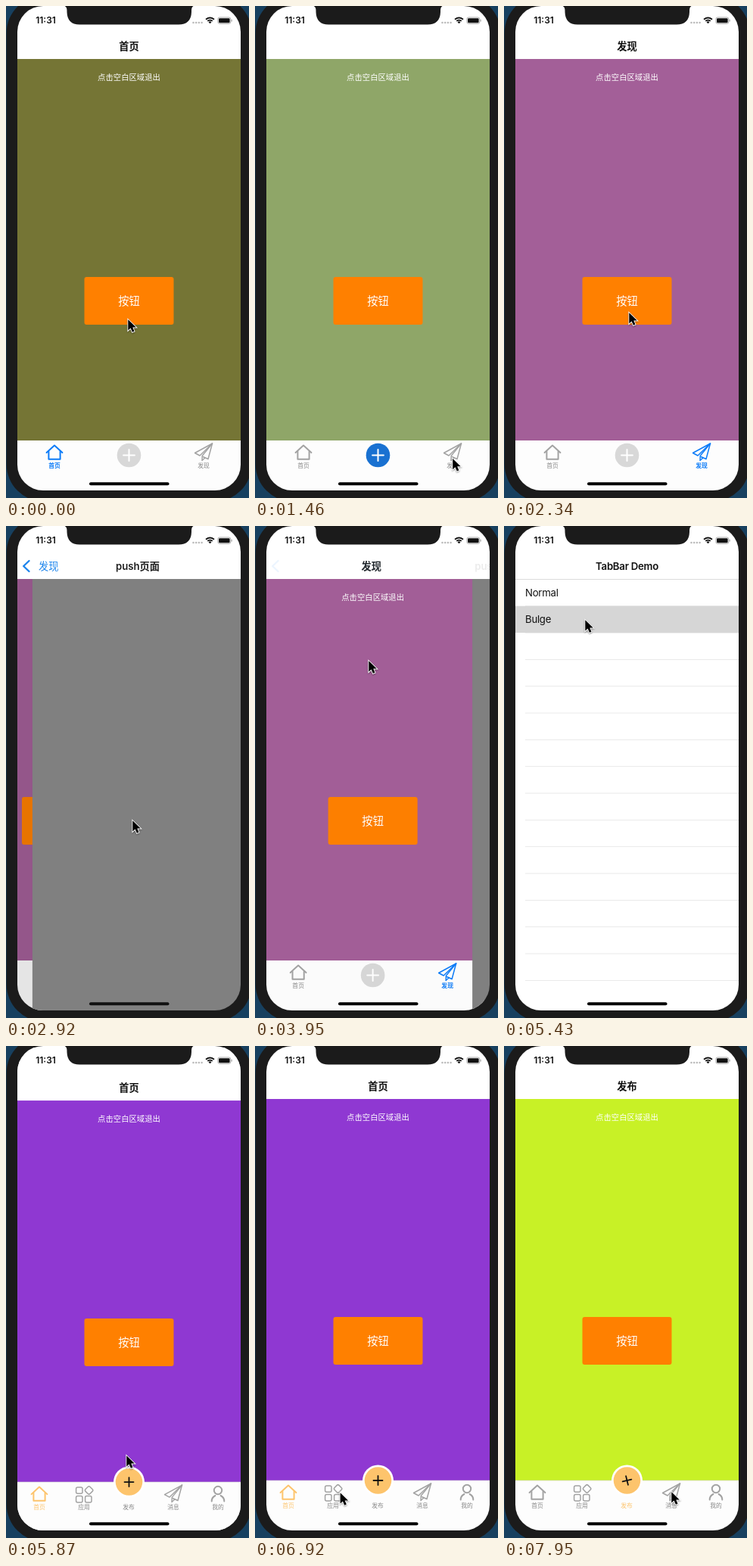
Animation of 321x650 px, one loop 8 s. Source, as an HTML page with a canvas:

```html
<!DOCTYPE html>
<html lang="zh">
<head>
<meta charset="utf-8">
<style>
html, body { margin: 0; width: 100%; height: 100%; overflow: hidden; background: #1b1b1b; }
canvas { display: block; width: 100vw; height: 100vh; }
</style>
</head>
<body>
<canvas id="stage"></canvas>
<script>
const W = 321, H = 650, LOOP = 8000;
const L = 15, R = 310, SW = R - L, BOT = 640, MID = 162.5, NAV = 70, TAB = 574;
const FONT = 'Inter, "Noto Sans CJK SC", "Noto Sans CJK", sans-serif';
const BLUE = '#0d7cf8', GOLD = '#fdc46c', ICON = '#a3a3a3', LABEL = '#888';

const cv = document.getElementById('stage');
const c = cv.getContext('2d');
const dpr = window.devicePixelRatio || 1;
cv.width = W * dpr;
cv.height = H * dpr;

const TICKS = [[0, 0], [8, 1170], [16, 2340], [20, 2920], [27, 3950], [34, 4990], [42, 6170], [50, 7360], [54, 7950]];
function hold(t) {
  let best = 0;
  for (let i = 1; i < TICKS.length; i++) {
    const [a, ta] = TICKS[i - 1], [b, tb] = TICKS[i];
    for (let k = a; k <= b; k++) {
      const s = Math.floor((ta + (tb - ta) * (k - a) / (b - a)) / 10) * 10;
      if (s <= t) best = s;
    }
  }
  return best;
}

const bez = (a, b, s) => 3 * (1 - s) * (1 - s) * s * a + 3 * (1 - s) * s * s * b + s * s * s;
// System transition curve, 500 ms
function slide(t, start) {
  const u = (t - start) / 500;
  if (u <= 0) return 0;
  if (u >= 1) return 1;
  let lo = 0, hi = 1;
  for (let i = 0; i < 24; i++) {
    const m = (lo + hi) / 2;
    if (bez(.38, .125, m) < u) lo = m; else hi = m;
  }
  return bez(.7, 1, lo);
}

// Pointer path: [ms, x, y]
const PATH = [[0, 161, 414], [600, 163, 588], [950, 165, 592], [1430, 261, 598], [1620, 259, 594],
  [2340, 165, 405], [2480, 167, 389], [2920, 167, 389], [3760, 150, 180], [3950, 150, 178],
  [4500, 149, 176], [5290, 108, 126], [5430, 107, 124], [5870, 159, 541], [6170, 150, 584],
  [6700, 103, 592], [7360, 142, 583], [7950, 221, 589]];
function pointer(t) {
  let i = 1;
  while (i < PATH.length - 1 && PATH[i][0] < t) i++;
  const a = PATH[i - 1], b = PATH[i];
  const u = Math.min(1, (t - a[0]) / (b[0] - a[0])), e = u * u * (3 - 2 * u);
  return [a[1] + (b[1] - a[1]) * e, a[2] + (b[2] - a[2]) * e];
}

function rect(x, y, w, h, color) {
  c.fillStyle = color;
  c.fillRect(x, y, w, h);
}
function rounded(x, y, w, h, r, color) {
  c.beginPath();
  c.roundRect(x, y, w, h, r);
  c.fillStyle = color;
  c.fill();
}
function disc(x, y, r, color) {
  c.beginPath();
  c.arc(x, y, r, 0, 7);
  c.fillStyle = color;
  c.fill();
}
function text(s, x, y, size, color, weight = 400, align = 'center', spacing = 0) {
  c.font = `${weight} ${size}px ${FONT}`;
  c.letterSpacing = spacing + 'px';
  c.textAlign = align;
  c.fillStyle = color;
  c.fillText(s, x, y + size * .37);
}
function faded(alpha, draw) {
  c.save();
  c.globalAlpha *= alpha;
  draw();
  c.restore();
}
function stroke(pts, color, width, closed) {
  c.beginPath();
  pts.forEach(p => c.lineTo(p[0], p[1]));
  if (closed) c.closePath();
  c.strokeStyle = color;
  c.lineWidth = width;
  c.lineJoin = c.lineCap = 'round';
  c.stroke();
}
function at(x, y, draw, angle = 0) {
  c.save();
  c.translate(x, y);
  c.rotate(angle);
  draw();
  c.restore();
}
function plus(r, color, width) {
  stroke([[-r, 0], [r, 0]], color, width);
  stroke([[0, -r], [0, r]], color, width);
}

const icons = {
  home(k) {
    stroke([[-10.4, .6], [0, -9], [10.4, .6]], k, 2);
    stroke([[-7.6, -1], [-7.6, 9.2], [7.6, 9.2], [7.6, -1]], k, 2);
  },
  plane(k) {
    stroke([[11.5, -11.5], [-11.5, 1], [-5, 4.5], [11.5, -11.5]], k, 1.5, true);
    stroke([[11.5, -11.5], [6, 9], [-.8, 6]], k, 1.5);
    stroke([[11.5, -11.5], [-1.8, 4.8], [-2, 11], [1.8, 7.4]], k, 1.4);
  },
  apps(k) {
    c.strokeStyle = k;
    c.lineWidth = 1.5;
    const cell = () => { c.beginPath(); c.roundRect(-4.2, -4.2, 8.4, 8.4, 2); c.stroke(); };
    at(-6.2, -4.4, cell);
    at(-6.2, 7.2, cell);
    at(5.8, 7.2, cell);
    at(6.6, -4.6, cell, Math.PI / 4);
  },
  person(k) {
    c.strokeStyle = k;
    c.lineWidth = 2;
    c.lineCap = 'round';
    c.beginPath();
    c.arc(0, -4.5, 5.2, 0, 7);
    c.stroke();
    c.beginPath();
    c.arc(0, 10, 8.3, Math.PI, Math.PI * 1.36);
    c.moveTo(8.3, 10);
    c.arc(0, 10, 8.3, 0, -Math.PI * .36, true);
    c.stroke();
  }
};

function tab(x, icon, label, on, tint) {
  if (icon) at(x, 589.5, () => icons[icon](on ? tint : ICON));
  text(label, x, 607, 7.8, on ? tint : LABEL, on && tint === BLUE ? 600 : 500);
}

// Body of a tab page with its bar, without the navigation bar
function page(p) {
  rect(L, NAV, SW, TAB - NAV, p.color);
  text('点击空白区域退出', MID, 94, 10.35, '#fff');
  rounded(103.5, 358, 118, 63, 3, '#ff8000');
  text('按钮', MID, 389.5, 14.3, '#fff');
  rect(L, TAB, SW, BOT - TAB, '#fdfdfd');
  if (p.bulge) {
    rect(L, TAB - .3, SW, .6, '#d0d0d0');
    tab(44, 'home', '首页', p.sel === 0, GOLD);
    tab(103, 'apps', '应用', false, GOLD);
    tab(162, null, '发布', p.sel === 2, GOLD);
    tab(221, 'plane', '消息', false, GOLD);
    tab(280, 'person', '我的', false, GOLD);
    disc(MID, 574, 20.5, '#fff');
    disc(MID, 574, 17.8, GOLD);
    at(MID, 574, () => plus(6, '#111', 1.8), p.tilt);
  } else {
    tab(64, 'home', '首页', p.sel === 0, BLUE);
    disc(MID, 593.5, 15.8, p.sel === 1 ? '#1971d1' : '#d8d8d8');
    at(MID, 593.5, () => plus(7.4, '#fff', 2));
    tab(261, 'plane', '发现', p.sel === 2, BLUE);
  }
}

function navBar(title, p) {
  rect(L, 0, SW, NAV, '#fff');
  if (!p) return text(title, MID, 53, 13.2, '#111', 600);
  const x = MID - 114 * p;
  faded(Math.max(0, 1 - p * 1.1), () => text(title, x, 53, 13.2, '#111', 600));
  faded(p, () => {
    text(title, x, 53, 13.2, '#0d7ceb');
    stroke([[30.5, 46], [23.2, 53], [30.5, 60]], '#0d7ceb', 2.4);
    text('push页面', MID + 170 * (1 - p), 53, 13.2, '#111', 600);
  });
}

function list(t) {
  rect(L, 0, SW, BOT, '#fff');
  text('TabBar Demo', MID, 53, 13.2, '#111', 600, 'center', -.25);
  const row = 35.33, top = 70.4;
  for (let i = 1; i <= 15; i++) rect(28, top + row * i - .4, R - 28, .8, '#e4e4e4');
  rect(L, top - .4, SW, .8, '#d2d2d2');
  if (t >= 5400) rect(L, top + row, SW, row, '#d6d6d6');
  text('Normal', 28, 88, 13.2, '#111', 400, 'left', -.25);
  text('Bulge', 28, 123.5, 13.2, '#111', 400, 'left', -.25);
}

function current(t) {
  if (t < 750) return { title: '首页', color: '#757535', sel: 0 };
  if (t < 1550) return { title: '', color: '#8fa668', sel: 1 };
  if (t < 5000) return { title: '发现', color: '#a35f98', sel: 2 };
  if (t < 7300) return { title: '首页', color: '#8f38d2', sel: 0, bulge: true, tilt: 0 };
  const tilt = -.24 * Math.cos(Math.PI * (t - 7950) / 147);
  return { title: '发布', color: '#c8f126', sel: 2, bulge: true, tilt };
}

function app(t) {
  const p = current(t);
  const drop = t < 5000 ? slide(t, 4300) : 1 - slide(t, 5442);
  if (drop > 0) list(t);
  if (drop >= 1) return;
  const push = slide(t, 2668) - slide(t, 3709);
  at(0, drop * BOT, () => {
    at(-.3 * SW * push, 0, () => page(p));
    if (push > 0) {
      rect(L, NAV, SW, BOT - NAV, `rgba(0,0,0,${.1 * push})`);
      rect(L + SW * (1 - push), NAV, SW, BOT - NAV, '#808080');
    }
    navBar(p.title, push);
  });
}

function statusBar() {
  text('11:31', 52.5, 19, 12, '#111', 600);
  for (let i = 0; i < 4; i++) disc(247.5 + i * 3.7, 22, 1.3, '#bbb');
  c.strokeStyle = '#111';
  c.lineCap = 'butt';
  c.lineWidth = 1.9;
  [4.6, 7.7].forEach(r => {
    c.beginPath();
    c.arc(269.5, 23.2, r, -Math.PI * .75, -Math.PI * .25);
    c.stroke();
  });
  c.beginPath();
  c.moveTo(269.5, 23.2);
  c.arc(269.5, 23.2, 2.8, -Math.PI * .75, -Math.PI * .25);
  c.fillStyle = '#111';
  c.fill();
  c.beginPath();
  c.roundRect(279.8, 15, 17, 8.4, 2.4);
  c.strokeStyle = '#999';
  c.lineWidth = .8;
  c.stroke();
  rounded(281, 16.2, 14.6, 6, 1.3, '#111');
  rect(297.6, 17.8, 1, 2.8, '#999');
}

function notch() {
  c.beginPath();
  c.moveTo(75, -1);
  c.quadraticCurveTo(80.5, 0, 80.5, 6);
  c.lineTo(80.5, 8);
  c.quadraticCurveTo(81, 24.5, 97, 24.5);
  c.lineTo(228, 24.5);
  c.quadraticCurveTo(244.5, 24.5, 245, 8);
  c.lineTo(245, 6);
  c.quadraticCurveTo(245, 0, 250, -1);
  c.fillStyle = '#1b1b1b';
  c.fill();
}

function cursor(x, y) {
  at(x, y, () => {
    c.beginPath();
    [[.3, .3], [.3, 14.6], [3.6, 11.6], [5.9, 16.8], [8.5, 15.7], [6.3, 10.6], [10.8, 10.6]]
      .forEach(p => c.lineTo(p[0], p[1]));
    c.closePath();
    c.shadowColor = 'rgba(0,0,0,.4)';
    c.shadowBlur = 2 * dpr;
    c.shadowOffsetY = dpr;
    c.lineJoin = 'miter';
    c.lineWidth = 1.8;
    c.strokeStyle = '#fff';
    c.stroke();
    c.shadowColor = 'transparent';
    c.fillStyle = '#000';
    c.fill();
  });
}

function draw(t) {
  c.setTransform(dpr, 0, 0, dpr, 0, 0);
  rect(0, 0, W, H, '#17405f');
  rounded(.6, -14, 324, 669, 50, '#1b1b1b');
  c.save();
  c.beginPath();
  c.roundRect(L, 0, SW, BOT, 34);
  c.clip();
  app(t);
  statusBar();
  rounded(110, 629.2, 105.5, 4, 2, t >= 2780 && t < 3800 ? '#111' : '#000');
  c.restore();
  notch();
  cursor(...pointer(t));
}

const start = performance.now();
function loop() {
  draw(hold((performance.now() - start) % LOOP));
  requestAnimationFrame(loop);
}
loop();
</script>
</body>
</html>
```
